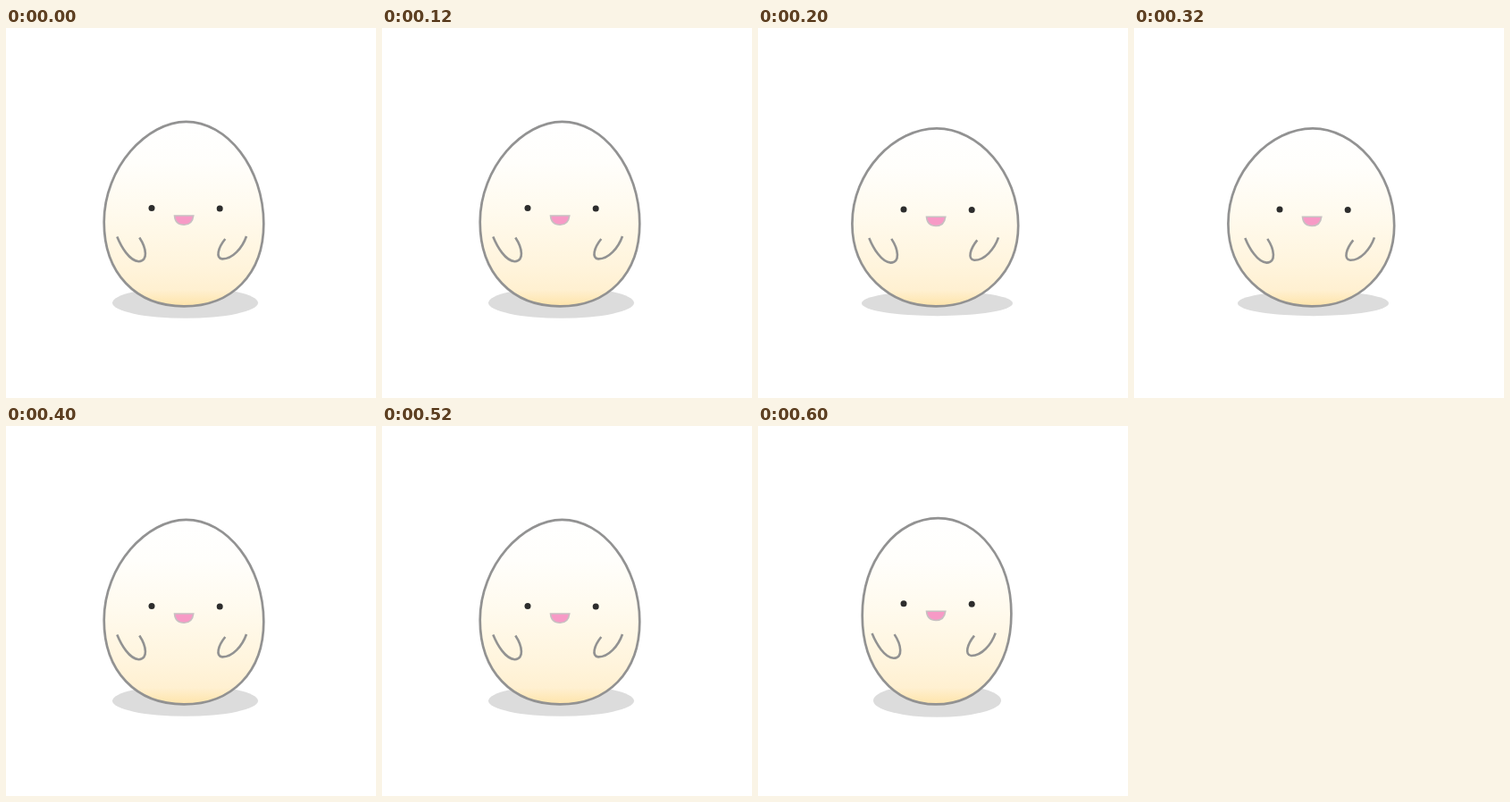
An HTML page with a canvas for the animation above (0.8 s loop, 414 px wide and 414 px high).

```html
<!DOCTYPE html>
<html lang="en">
<head>
<meta charset="utf-8">
<title>Bouncing egg</title>
<style>
  html, body { margin: 0; width: 100%; height: 100%; overflow: hidden; background: #fff; }
  canvas { display: block; width: 414px; height: 414px; }
</style>
</head>
<body>
<canvas id="stage" width="414" height="414"></canvas>
<script>
const canvas = document.getElementById('stage');
const ctx = canvas.getContext('2d');
const ratio = window.devicePixelRatio || 1;
canvas.width = canvas.height = Math.round(414 * ratio);
ctx.scale(ratio, ratio);

const OUTLINE = '#929292';
const STEP = 200;
const BOTTOM = 311.4;

// top/left/right: extreme points of the shell; k: handle lengths as
// fractions of each quarter's width (topL, topR, lowX) and height (sideY, lowY).
const rest = {
  top: [201.5, 104.8], left: [109.7, 217], right: [288.3, 219],
  k: { topL: 0.475, topR: 0.53, sideY: 0.545, lowY: 0.61, lowX: 0.6 },
  shadow: [200.5, 307.5, 81.5, 17.3],
  eyes: 201.5, mouth: 210, arms: 0, tuck: 0
};
const squash = {
  top: [200, 112.4], left: [105.4, 219], right: [291.2, 221],
  k: { topL: 0.5, topR: 0.51, sideY: 0.55, lowY: 0.58, lowX: 0.57 },
  shadow: [200.5, 308, 84.5, 14.2],
  eyes: 203, mouth: 211.2, arms: 1.4, tuck: 0
};
const stretch = {
  top: [201.5, 103.2], left: [116.7, 212], right: [283.4, 210],
  k: { topL: 0.55, topR: 0.55, sideY: 0.565, lowY: 0.6, lowX: 0.58 },
  shadow: [200.5, 307.2, 71.5, 18.6],
  eyes: 198.7, mouth: 207.2, arms: -1.4, tuck: 3.3
};
const poses = [rest, squash, rest, stretch];

function ellipse(x, y, rx, ry, color) {
  ctx.beginPath();
  ctx.ellipse(x, y, rx, ry, 0, 0, Math.PI * 2);
  ctx.fillStyle = color;
  ctx.fill();
}

function shell({ top: [tx, ty], left: [lx, ly], right: [rx, ry], k }) {
  const bx = 199;
  ctx.beginPath();
  ctx.moveTo(tx, ty);
  ctx.bezierCurveTo(tx + (rx - tx) * k.topR, ty, rx, ry - (ry - ty) * k.sideY, rx, ry);
  ctx.bezierCurveTo(rx, ry + (BOTTOM - ry) * k.lowY, bx + (rx - bx) * k.lowX, BOTTOM, bx, BOTTOM);
  ctx.bezierCurveTo(bx - (bx - lx) * k.lowX, BOTTOM, lx, ly + (BOTTOM - ly) * k.lowY, lx, ly);
  ctx.bezierCurveTo(lx, ly - (ly - ty) * k.sideY, tx - (tx - lx) * k.topL, ty, tx, ty);
  ctx.closePath();

  const fill = ctx.createLinearGradient(0, ty, 0, BOTTOM);
  fill.addColorStop(0, '#ffffff');
  fill.addColorStop(0.22, '#fffefb');
  fill.addColorStop(0.5, '#fffaed');
  fill.addColorStop(0.78, '#fff4dc');
  fill.addColorStop(0.91, '#fff0d1');
  fill.addColorStop(1, '#fee4aa');
  ctx.fillStyle = fill;
  ctx.fill();
  ctx.lineWidth = 2.7;
  ctx.strokeStyle = OUTLINE;
  ctx.stroke();
}

function arm(path, dx, dy) {
  ctx.save();
  ctx.translate(dx, dy);
  ctx.lineWidth = 2.6;
  ctx.strokeStyle = OUTLINE;
  ctx.stroke(path);
  ctx.restore();
}

const leftArm = new Path2D('M124.3 233.5C129 245 138 260.5 148.5 261.2C159.5 261 157 246 149.3 234.5');
const rightArm = new Path2D('M269 233C264.5 246 253.5 258.6 242 258.4C234 257.5 237.5 245.5 245.3 236');

function mouth(y) {
  ctx.beginPath();
  ctx.moveTo(188.5, y);
  ctx.lineTo(209.8, y);
  ctx.bezierCurveTo(209, y + 6.5, 205, y + 10.3, 199.3, y + 10.3);
  ctx.bezierCurveTo(193, y + 10.3, 189, y + 6.5, 188.5, y);
  ctx.closePath();
  ctx.fillStyle = '#f79ac6';
  ctx.fill();
  ctx.lineWidth = 1.6;
  ctx.strokeStyle = '#c8c0c2';
  ctx.stroke();
}

function draw(pose) {
  ctx.fillStyle = '#fff';
  ctx.fillRect(0, 0, 414, 414);
  ellipse(...pose.shadow, '#dcdcdc');
  shell(pose);
  arm(leftArm, pose.tuck, pose.arms);
  arm(rightArm, -pose.tuck, pose.arms);
  ellipse(163, pose.eyes, 3.5, 3.5, '#2d2d2d');
  ellipse(239.2, pose.eyes + 0.6, 3.5, 3.5, '#2d2d2d');
  mouth(pose.mouth);
}

const start = performance.now();
function tick() {
  const elapsed = performance.now() - start;
  draw(poses[Math.floor(elapsed / STEP) % poses.length]);
  requestAnimationFrame(tick);
}
tick();
</script>
</body>
</html>
```
